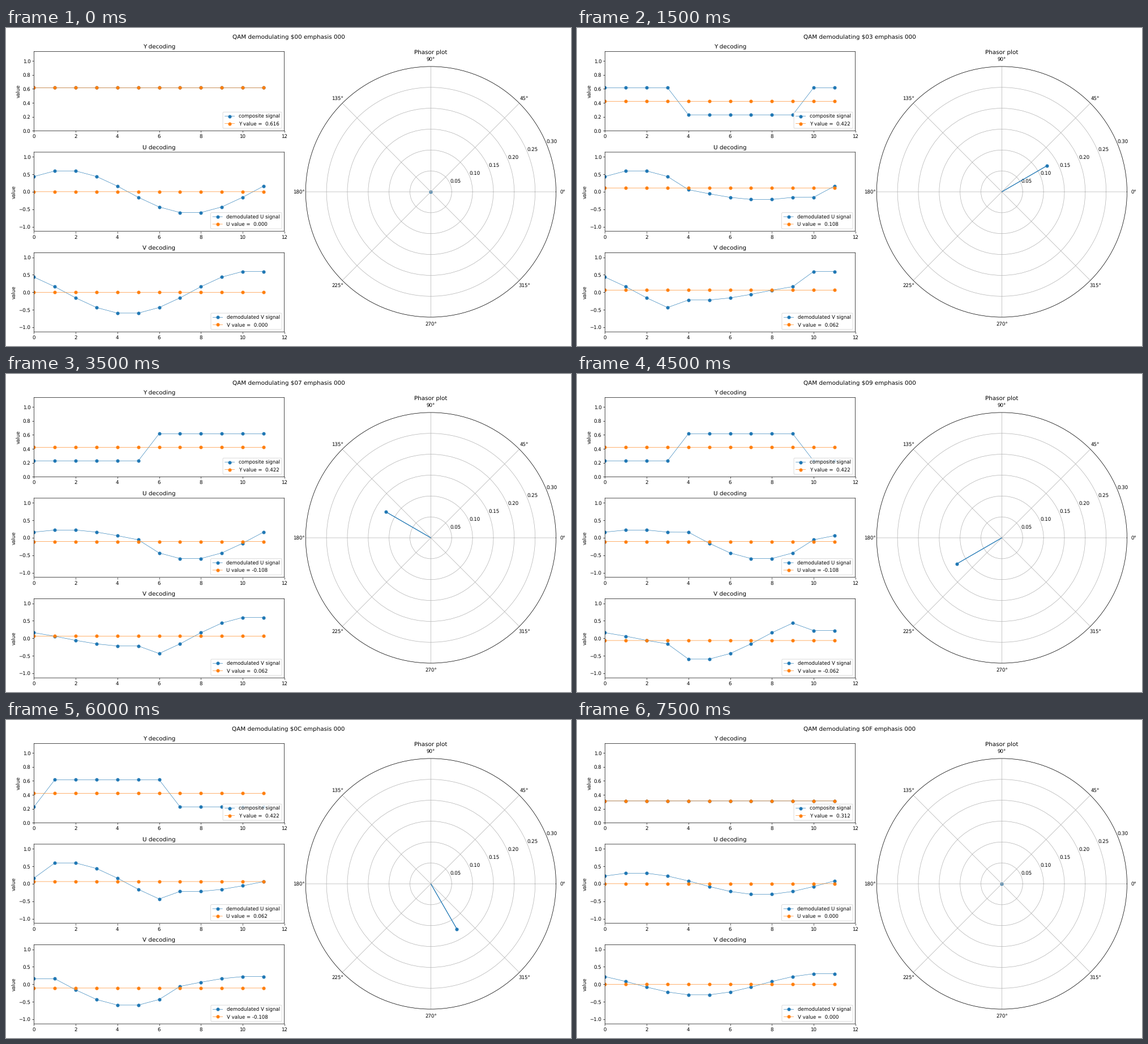
Recreate the animation shown at these times as a matplotlib script. Size 998 by 561 pixels, loop 8000 ms.

```python
import numpy as np
import matplotlib.pyplot as plt
from matplotlib.animation import FuncAnimation

plt.rcParams.update({
    "font.family": "DejaVu Sans",
    "path.snap": False,
    "text.hinting": "none",
})

W, H, DPI = 998, 561, 62.375
LOW, HIGH, BLACK = 0.228, 0.616, 0.312   # signal levels in volts
PEAK = 1.133
STEPS = np.arange(12)
CARRIER = 2 * np.pi * STEPS / 12 + np.pi / 4

fig = plt.figure(figsize=(16, 8.994), dpi=DPI)
title = fig.suptitle(" ")


def add_axes(left, top, width, height, **kw):
    """Add axes placed in pixels from the top left corner."""
    box = [left / W, 1 - (top + height) / H, width / W, height / H]
    return fig.add_axes(box, **kw)


def composite(hue):
    """One subcarrier cycle of the colour $0<hue>."""
    if hue == 0:
        return np.full(12, HIGH)
    if hue == 13:
        return np.full(12, LOW)
    if hue > 13:
        return np.full(12, BLACK)
    return np.where((STEPS + hue - 1) % 12 < 6, HIGH, LOW)


class Panel:
    def __init__(self, name, row, signal, ymin, yticks):
        self.name = name
        ax = add_axes(49.4, 41.6 + 177.4 * row, 442.2, 139.7)
        style = dict(marker="o", linewidth=0.7)
        self.wave, = ax.plot(STEPS, 0 * STEPS, label=signal, **style)
        self.mean, = ax.plot(STEPS, 0 * STEPS, label=name, **style)
        ax.set(title=f"{name} decoding", ylabel="value",
               xlim=(0, 12), ylim=(ymin, PEAK),
               xticks=range(0, 13, 2), yticks=yticks)
        self.text = ax.legend(loc="lower right").get_texts()[1]

    def show(self, wave):
        mean = wave.mean()
        self.wave.set_ydata(wave)
        self.mean.set_ydata(np.full(12, mean))
        shown = round(mean, 3) + 0.0   # avoids a negative zero
        self.text.set_text(f"{self.name} value = {shown: .3f}")
        return mean


half_ticks = np.linspace(-1, 1, 5)
y_panel = Panel("Y", 0, "composite signal", 0, np.linspace(0, 1, 6))
u_panel = Panel("U", 1, "demodulated U signal", -PEAK, half_ticks)
v_panel = Panel("V", 2, "demodulated V signal", -PEAK, half_ticks)

polar = add_axes(529.3, 67.9, 442.2, 442.2, projection="polar")
polar.set_title("Phasor plot")
polar.set_ylim(0, 0.3)
polar.set_yticks(np.arange(1, 7) * 0.05)
tip = polar.scatter([0], [0], color="C0")
arm, = polar.plot([0, 0], [0, 0], color="C0", solid_capstyle="butt")


def update(hue):
    signal = composite(hue)
    title.set_text(f"QAM demodulating ${hue:02X} emphasis 000")
    y_panel.show(signal)
    u = u_panel.show(signal * np.sin(CARRIER))
    v = v_panel.show(signal * np.cos(CARRIER))
    angle, radius = np.arctan2(v, u), np.hypot(u, v)
    tip.set_offsets([[angle, radius]])
    arm.set_data([angle, angle], [0, radius])
    return []


anim = FuncAnimation(fig, update, frames=16, interval=500,
                     repeat=True, repeat_delay=0, blit=False)
plt.show()
```
